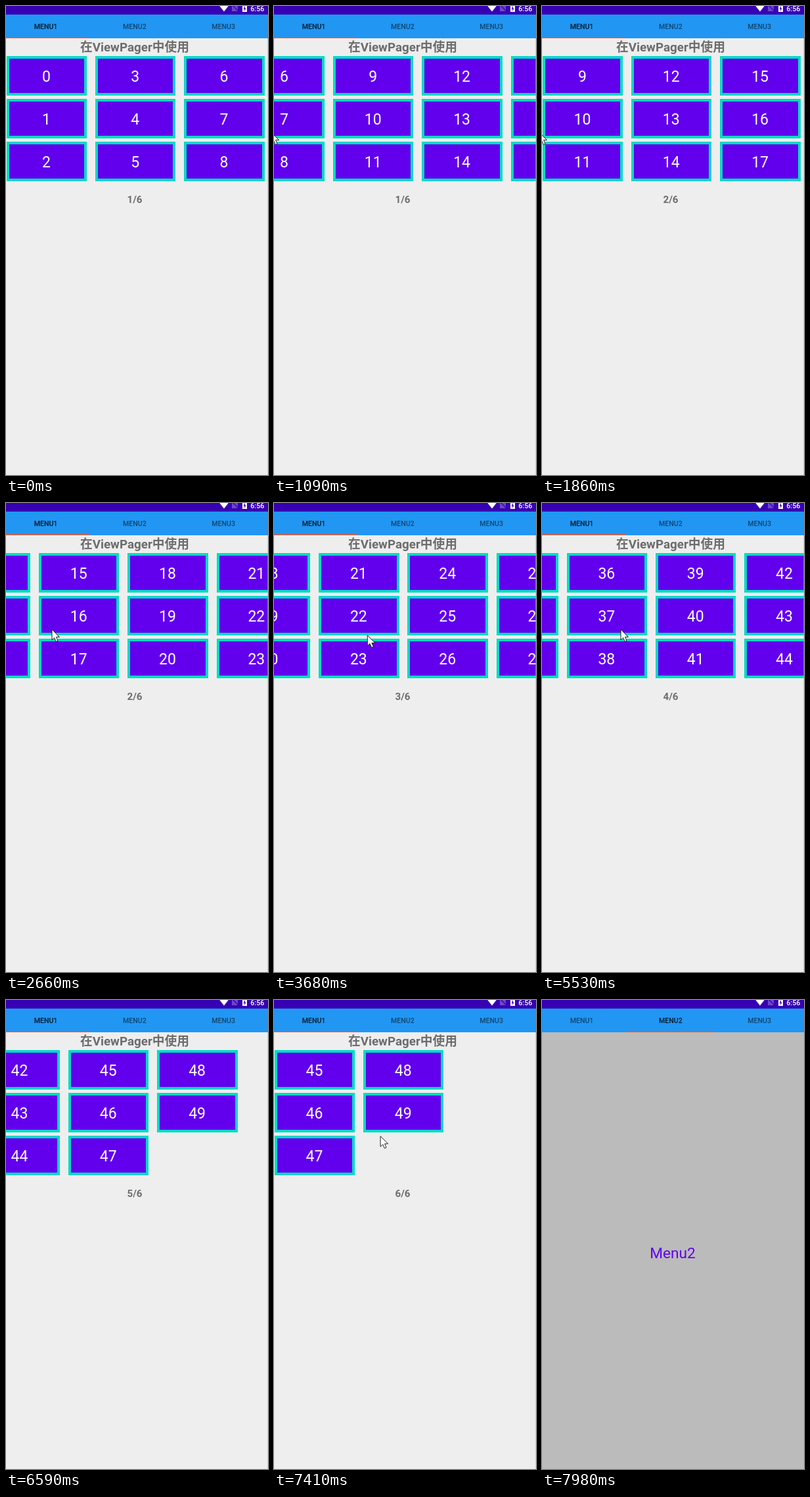
An HTML page with a canvas that plays this animation: 399x712 px, repeating every 8000 ms.

```html
<!DOCTYPE html>
<html lang="zh-CN">
<head>
<meta charset="utf-8">
<title>ViewPager grid</title>
<style>
  html, body { margin: 0; width: 100%; height: 100%; overflow: hidden; background: #eee; }
  canvas { display: block; }
</style>
</head>
<body>
<canvas id="stage" width="399" height="712"></canvas>
<script>
const ctx = document.getElementById('stage').getContext('2d');
const LOOP = 8000, WIDTH = 399, HEIGHT = 712;
const COLUMN = 135.33, PAGE = COLUMN * 3, CELLS = 50;
const FONTS = 'Roboto, "Noto Sans CJK SC", "Noto Sans CJK JP", sans-serif';

// The pointer presses at one spot and flicks left to restX; the content glides on.
const PRESS = { x: 240, y: 213 }, REST_Y = 192, APPROACH = 400, FLICK = 220;
const gesture = (start, restX, duration = 1170) => ({ start, restX, duration });
const swipes = [
  gesture(470, -4),
  gesture(2280, 70),
  gesture(3604.5, 70, 875),
  gesture(4714, 120),
  gesture(5985, -20)
];
const tabSwitch = gesture(7630, -20, 340);
const gestures = [...swipes, tabSwitch];

const clamp = v => Math.min(1, Math.max(0, v));
const mix = (a, b, k) => a + (b - a) * k;
const decelerate = (t, start, duration) => 1 - (1 - clamp((t - start) / duration)) ** 2;
const progress = (t, g) => decelerate(t, g.start, g.duration);

function rect(x, y, w, h, color) {
  ctx.fillStyle = color;
  ctx.fillRect(x, y, w, h);
}

function shape(path, color) {
  ctx.fillStyle = color;
  ctx.fill(new Path2D(path));
}

function text(label, x, baseline, size, color, weight = 400) {
  ctx.font = `${weight} ${size}px ${FONTS}`;
  ctx.fillStyle = color;
  ctx.textAlign = 'center';
  ctx.fillText(label, x, baseline);
}

function drawGrid(scroll) {
  for (let n = 0; n < CELLS; n++) {
    const x = 0.6 + Math.floor(n / 3) * COLUMN - scroll;
    if (x < -COLUMN || x > WIDTH) continue;
    const y = 76 + (n % 3) * 65;
    const left = Math.round(x), width = Math.round(x + 122.5) - left;
    rect(left, y, width, 60, '#03dac5');
    rect(left + 4, y + 4, width - 8, 52, '#6200ee');
    text(n, x + 60.8, y + 38.7, 23, '#fff');
  }
}

function drawPages(t, slide) {
  const scroll = swipes.reduce((sum, s) => sum + progress(t, s) * PAGE, 0);
  const current = 1 + swipes.filter(s => progress(t, s) === 1).length;
  ctx.save();
  ctx.translate(-slide * PAGE, 0);
  text('在ViewPager中使用', 196, 69, 18.8, '#6d6d6d', 700);
  drawGrid(scroll);
  text(`${current}/6`, 196, 298.8, 15.2, '#6d6d6d', 700);
  rect(PAGE - 7.5, 49, PAGE + 8, HEIGHT, '#bbb');
  text('Menu2', PAGE + 199, 392, 22.7, '#6200ee');
  ctx.restore();
}

function drawTabs(slide) {
  rect(0, 13, WIDTH, 36, '#2196f3');
  const selected = Math.round(slide);
  for (let i = 0; i < 3; i++) {
    text(`MENU${i + 1}`, 60.5 + i * COLUMN, 35, 10.6,
      `rgba(0,0,0,${i === selected ? 0.87 : 0.54})`, 500);
  }
  rect(slide * COLUMN - 8, 47.2, COLUMN, 1.8, '#d9603f');
}

function drawStatusBar() {
  rect(0, 0, WIDTH, 13, '#3700b3');
  shape('M324.5 -1h15l-7.5 9.5z', '#fff');
  shape('M344 -1l9 9h-9zM346 -1h7v7z', 'rgba(255,255,255,.28)');
  rect(360, -1, 7, 10, '#fff');
  shape('M364 0l-2.5 4.5h1.7v3.5l2.3 -4.5h-1.5z', '#3700b3');
  text('6:56', 382.8, 8, 10.7, '#fff', 500);
}

function drawPointer(t) {
  let x = 300, y = HEIGHT;
  for (const { start, restX } of gestures) {
    const approach = decelerate(t, start - APPROACH, APPROACH);
    const flick = decelerate(t, start, FLICK);
    x = mix(mix(x, PRESS.x, approach), restX, flick);
    y = mix(mix(y, PRESS.y, approach), REST_Y, flick);
  }
  ctx.save();
  ctx.translate(x, y);
  const arrow = new Path2D('M0 0v16l3.7 -3.5l2.6 6l2.7 -1.2l-2.5 -5.8h5z');
  ctx.fillStyle = '#fff';
  ctx.fill(arrow);
  ctx.strokeStyle = '#222';
  ctx.stroke(arrow);
  ctx.restore();
}

const origin = performance.now();

function draw() {
  const t = (performance.now() - origin) % LOOP;
  const slide = progress(t, tabSwitch);
  rect(0, 0, WIDTH, HEIGHT, '#eee');
  drawPages(t, slide);
  drawTabs(slide);
  drawStatusBar();
  drawPointer(t);
  requestAnimationFrame(draw);
}
draw();
</script>
</body>
</html>
```
